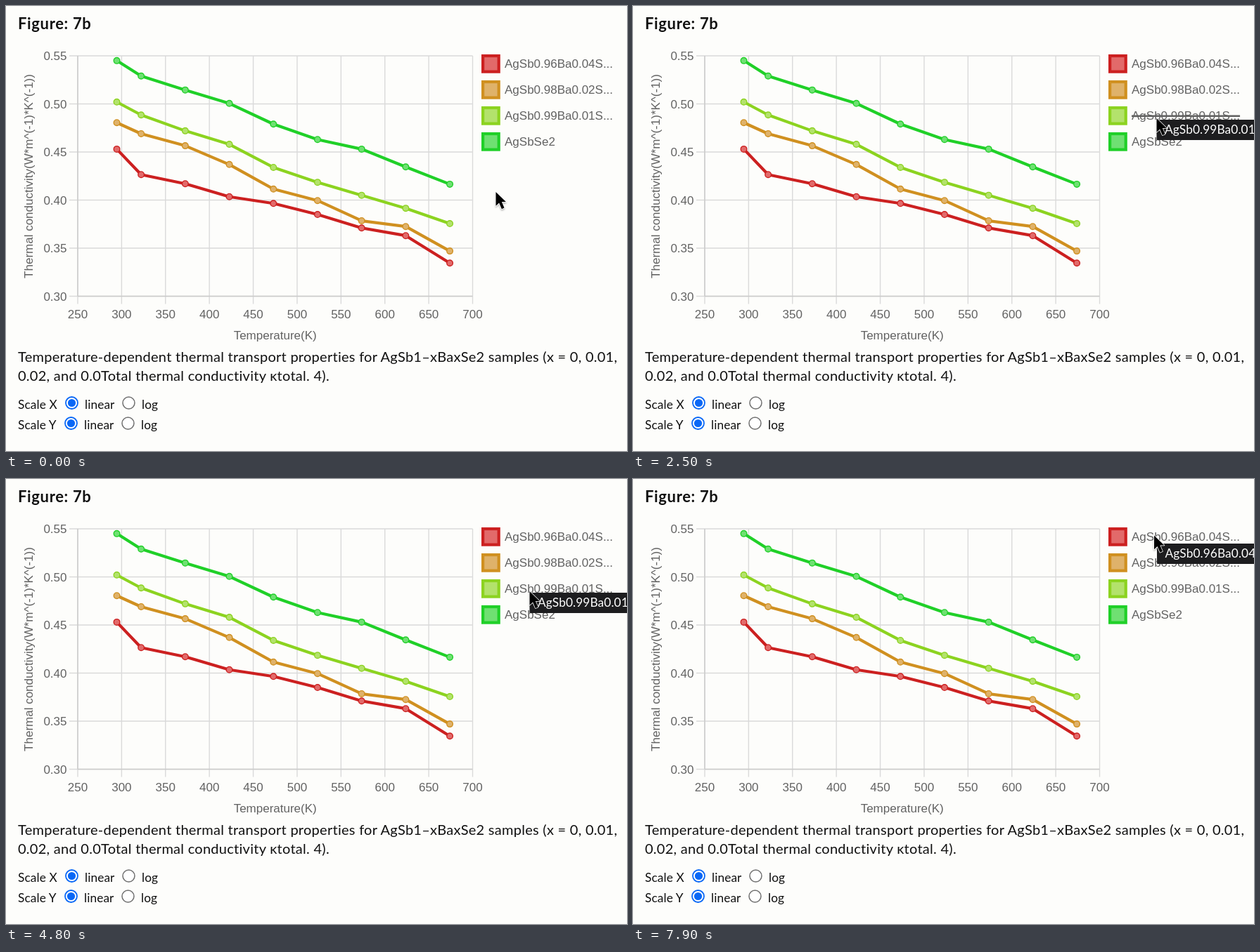
An HTML page that plays this animation: 883x634 px, repeating every 8000 ms.

```html
<!DOCTYPE html>
<html lang="en">
<head>
<meta charset="utf-8">
<title>Thermal conductivity chart</title>
<style>
  html, body { margin: 0; width: 100%; height: 100%; overflow: hidden; background: #fdfdfb; }
  svg { display: block; width: 883px; height: 634px; }
  text { white-space: pre; }
  .page { font-family: Lato, "Open Sans", sans-serif; fill: #111; }
  .title { font-size: 22px; font-weight: 700; letter-spacing: .65px; }
  .caption { font-size: 20px; letter-spacing: .27px; }
  .option { font-size: 17.3px; letter-spacing: .1px; }
  .ring { fill: #fff; stroke: #707070; stroke-width: 1.5; }
  .ring.on { stroke: #0a68f6; stroke-width: 1.8; }
  .chart { font: 17px "Liberation Sans", Arial, sans-serif; fill: #626262; }
  .grid { stroke: #dadada; stroke-width: 1.4; }
  .axis { stroke: #cacaca; stroke-width: 1.4; }
  .curve { fill: none; stroke-width: 4.2; stroke-linejoin: round; }
  .dot { stroke-width: 1.4; }
  .swatch { stroke-width: 4.2; }
  .strike { stroke: #606060; stroke-width: 2.6; }
  .middle { text-anchor: middle; }
  .end { text-anchor: end; }
  .tip { font: 17.3px Lato, "Open Sans", sans-serif; letter-spacing: .1px; fill: #fff; }
  .pointer { stroke: #fff; stroke-width: 1.4; stroke-linejoin: round; paint-order: stroke; }
</style>
</head>
<body>
<svg id="stage" viewBox="0 0 883 634">
  <defs>
    <clipPath id="area"><rect x="95" y="64.5" width="575" height="356"/></clipPath>
    <filter id="shadow" x="-50%" y="-50%" width="200%" height="200%">
      <feDropShadow dx="0" dy="1.5" stdDeviation="1.3" flood-opacity=".35"/>
    </filter>
  </defs>
</svg>
<script>
const LOOP = 8000, STEP = 100, FADE = 1000;
const LEFT = 102, RIGHT = 663.5, TOP = 71, BOTTOM = 413.5;
const WIDE = { low: 0.30, step: 0.05, count: 5 };
const TIGHT = { low: 0.32, step: 0.02, count: 10 };

// k: measured conductivity in mW/(m K), one value per temperature
const series = [
  { name: 'AgSb0.96Ba0.04Se2', hue: '#cc2020', fill: '#e26a6a',
    k: [453, 426.5, 417, 403.5, 396.5, 385, 371, 363, 334.5] },
  { name: 'AgSb0.98Ba0.02Se2', hue: '#d09020', fill: '#dfb26a',
    k: [480.5, 469, 456.5, 437, 411.5, 399.5, 378.5, 372.5, 347] },
  { name: 'AgSb0.99Ba0.01Se2', hue: '#8cd320', fill: '#b3e26c', hide: 2500, show: 4000,
    k: [502, 488.5, 472, 458, 434, 418.5, 405, 391.5, 375.5] },
  { name: 'AgSbSe2', hue: '#20d028', fill: '#6fe072', hide: 5480, show: 6715,
    k: [545, 529, 514.5, 500.5, 479, 463, 453, 434.5, 416.5] }
];

// Where the pointer rests; tip gives the label's offset while it hovers over a legend row.
const stops = [
  { from: 0, to: 300, x: 696.5, y: 265 },
  { from: 1100, to: 1900, x: 703, y: 153, row: 2, tip: [-14, 2] },
  { from: 2200, to: 2900, x: 744.5, y: 160, row: 2, tip: [0, 2] },
  { from: 3300, to: 3700, x: 744.5, y: 145 },
  { from: 3900, to: 4900, x: 744.5, y: 160, row: 2, tip: [0, 2] },
  { from: 5250, to: 7000, x: 729, y: 192, row: 3, tip: [6, -12] },
  { from: 7400, to: LOOP, x: 741, y: 80.5, row: 0, tip: [4, 11.5] }
];

const stage = document.getElementById('stage');

function set(el, attrs) {
  for (const key in attrs) el.setAttribute(key, attrs[key]);
}
function add(parent, tag, attrs = {}, text = '') {
  const el = document.createElementNS('http://www.w3.org/2000/svg', tag);
  set(el, attrs);
  el.textContent = text;
  return parent.appendChild(el);
}
const addLine = (parent, cls, x1, y1, x2, y2) => add(parent, 'line', { class: cls, x1, y1, x2, y2 });
const write = (parent, cls, x, y, text) => add(parent, 'text', { class: cls, x, y }, text);
const toggle = (el, on) => set(el, { visibility: on ? 'visible' : 'hidden' });

const mix = (a, b, k) => a + (b - a) * k;
const clamp = v => Math.min(1, Math.max(0, v));
const easeOut = v => 1 - (1 - clamp(v)) ** 4;
const easeInOut = v => v * v * (3 - 2 * v);

const temperature = i => i ? 272 + 50.25 * i : 294.5;
const xOf = kelvin => mix(LEFT, RIGHT, (kelvin - 250) / 450);
const yOf = (value, { low, step, count }) => mix(BOTTOM, TOP, (value - low) / (step * count));

function drawPage() {
  const page = add(stage, 'g', { class: 'page' });
  write(page, 'title', 17, 32.5, 'Figure: 7b');
  write(page, 'caption', 17, 507, 'Temperature-dependent thermal transport properties for AgSb1–xBaxSe2 samples (x = 0, 0.01,');
  write(page, 'caption', 17, 533.5, '0.02, and 0.0Total thermal conductivity κtotal. 4).');
  ['X', 'Y'].forEach((name, i) => {
    const y = 574 + 29 * i, cy = y - 8.5;
    write(page, 'option', 17, y, 'Scale ' + name);
    write(page, 'option', 112 - i, y, 'linear');
    write(page, 'option', 193 - i, y, 'log');
    add(page, 'circle', { class: 'ring on', cx: 93.5 - i, cy, r: 8.5 });
    add(page, 'circle', { cx: 93.5 - i, cy, r: 5.6, fill: '#0a68f6' });
    add(page, 'circle', { class: 'ring', cx: 174.5 - i, cy, r: 8.5 });
  });
}

function drawScale(parent, scale) {
  const g = add(parent, 'g');
  for (let i = 0; i <= scale.count; i++) {
    const value = scale.low + scale.step * i, y = yOf(value, scale);
    addLine(g, 'grid', LEFT - 12, y, RIGHT, y);
    write(g, 'end', 86.5, y + 6, value.toFixed(2));
  }
  scale.group = g;
}

function drawAxes(chart) {
  for (let kelvin = 250; kelvin <= 700; kelvin += 50) {
    const x = xOf(kelvin);
    addLine(chart, 'grid', x, TOP, x, BOTTOM + 11);
    write(chart, 'middle', x, 445, kelvin);
  }
  drawScale(chart, WIDE);
  drawScale(chart, TIGHT);
  addLine(chart, 'axis', LEFT, TOP, LEFT, BOTTOM);
  addLine(chart, 'axis', LEFT, BOTTOM, RIGHT, BOTTOM);
  write(chart, 'middle', 382.7, 475, 'Temperature(K)');
  const label = write(chart, 'middle', 0, 0, 'Thermal conductivity(W*m^(-1)*K^(-1))');
  set(label, { transform: 'translate(38 242.5) rotate(-90)' });
}

function drawSeries(chart) {
  const plot = add(chart, 'g', { 'clip-path': 'url(#area)' });
  series.forEach((s, row) => {
    s.group = add(plot, 'g', { stroke: s.hue, fill: s.fill });
    plot.prepend(s.group);
    s.curve = add(s.group, 'polyline', { class: 'curve' });
    s.dots = s.k.map((_, i) => add(s.group, 'circle', { class: 'dot', cx: xOf(temperature(i)), r: 4.3 }));

    const y = 82 + 37 * row;
    add(chart, 'rect', { class: 'swatch', x: 678.1, y: y - 11, width: 22.6, height: 22.6, fill: s.fill, stroke: s.hue });
    const label = write(chart, '', 709, y + 6, s.name.replace(/(.{14}S).+/, '$1...'));
    s.strike = addLine(chart, 'strike', 709, y + 0.7, 709 + label.getComputedTextLength(), y + 0.7);
  });
}

drawPage();
const chart = add(stage, 'g', { class: 'chart' });
drawAxes(chart);
drawSeries(chart);
const tip = add(stage, 'g');
const tipBox = add(tip, 'rect', { height: 29, rx: 1, fill: '#1d1d1f' });
const tipText = write(tip, 'tip', 11.5, 20, '');
const pointer = add(stage, 'path', {
  class: 'pointer', filter: 'url(#shadow)',
  d: 'M0 0V19.8L4.6 15.6L8.4 24.2L12 22.6L8.4 14.1H14.4Z'
});

// 0 while shown, 1 once hidden
function hiddenAmount({ hide, show }, t) {
  if (!hide) return 0;
  return t < show ? easeOut((t - hide) / FADE) : 1 - easeOut((t - show) / FADE);
}

function renderSeries(t) {
  const tallest = series[3];
  const zoom = hiddenAmount(tallest, t);
  const zoomed = t >= tallest.hide && t < tallest.show;
  toggle(TIGHT.group, zoomed);
  toggle(WIDE.group, !zoomed);

  for (const s of series) {
    const opacity = 1 - hiddenAmount(s, t);
    const ys = s.k.map(k => mix(yOf(k / 1000, WIDE), yOf(k / 1000, TIGHT), zoom));
    const points = ys.map((y, i) => xOf(temperature(i)) + ',' + y).join(' ');
    set(s.curve, { points, opacity });
    s.dots.forEach((dot, i) => set(dot, { cy: ys[i], opacity }));
    toggle(s.strike, t >= s.hide && t < s.show);
  }
}

function renderPointer(t) {
  const next = stops.findIndex(s => s.to > t);
  const b = stops[next], a = stops[next - 1] || b;
  const k = t < b.from ? easeInOut((t - a.to) / (b.from - a.to)) : 1;
  set(pointer, { transform: `translate(${mix(a.x, b.x, k)} ${mix(a.y, b.y, k)})` });

  const hover = stops.find(s => s.tip && t >= s.from - STEP && t < s.to + STEP);
  toggle(tip, hover);
  if (!hover) return;
  tipText.textContent = series[hover.row].name;
  set(tipBox, { width: tipText.getComputedTextLength() + 23 });
  set(tip, { transform: `translate(${hover.x + hover.tip[0]} ${hover.y + hover.tip[1]})` });
}

const start = performance.now();
function tick() {
  const elapsed = (performance.now() - start) % LOOP;
  const t = Math.floor(elapsed / STEP) * STEP;
  renderSeries(t);
  renderPointer(t);
  requestAnimationFrame(tick);
}
tick();
</script>
</body>
</html>
```
